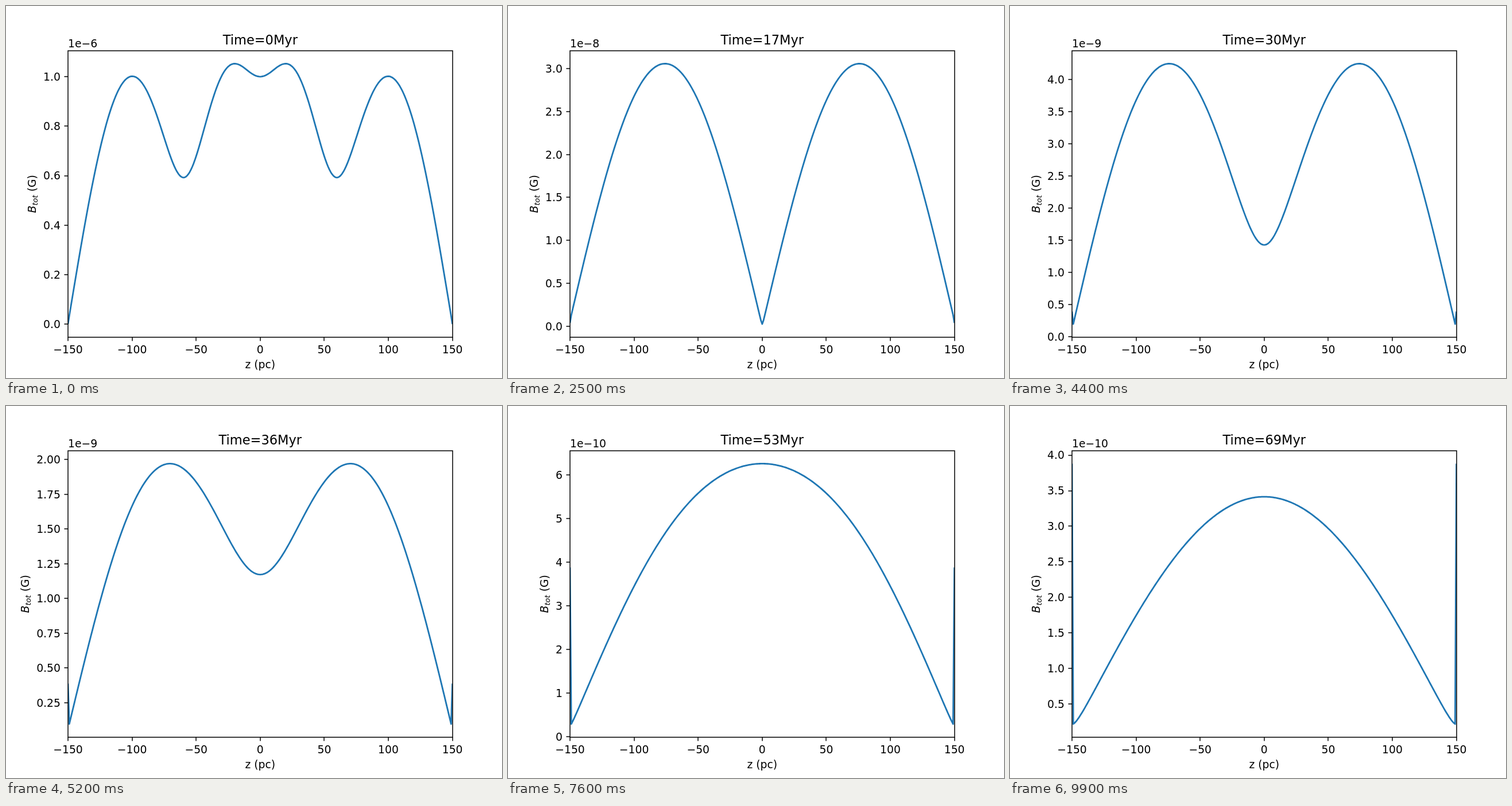
Recreate the animation shown at these times as an HTML page with a canvas. Size 864 px wide and 648 px high, loop 10000 ms.

```html
<!DOCTYPE html>
<html lang="en">
<head>
<meta charset="utf-8">
<title>Field decay</title>
<style>
  html, body { margin: 0; width: 100%; height: 100%; overflow: hidden; background: #fff; }
  canvas { display: block; }
</style>
</head>
<body>
<canvas id="plot" width="864" height="648"></canvas>
<script>
const ctx = document.getElementById('plot').getContext('2d');
const FRAMES = 100, FRAME_MS = 100, MYR = 0.7;
const LEFT = 108, RIGHT = 777.6, TOP = 77.76, BOTTOM = 576.72;
const MID_X = (LEFT + RIGHT) / 2, MID_Y = (TOP + BOTTOM) / 2;
const FONT = '"DejaVu Sans", sans-serif';

// Two field components (in microgauss) on a 1 pc grid, z = -151..151,
// diffusing with fixed end values.
const SIZE = 303, STEPS = 600, RATE = 347.7 * MYR / STEPS;
const EDGE = 3.88e-4, GHOST = 2.05e-5;

function diffuse(u) {
  for (let s = 0; s < STEPS; s++) {
    let prev = u[0];
    for (let i = 1; i < SIZE - 1; i++) {
      const cur = u[i];
      u[i] += RATE * (prev - 2 * cur + u[i + 1]);
      prev = cur;
    }
  }
}

function simulate() {
  const even = new Float64Array(SIZE), odd = new Float64Array(SIZE);
  for (let i = 1; i < SIZE - 1; i++) {
    const z = i - 151;
    even[i] = Math.cos(Math.PI * z / 100.04);
    odd[i] = 0.04 * z * Math.exp(-z * z / 2312);
  }
  odd[0] = -GHOST;
  odd[SIZE - 1] = GHOST;
  return Array.from({ length: FRAMES }, (_, n) => {
    if (n) { diffuse(even); diffuse(odd); }
    const total = Array.from(even, (e, i) => Math.hypot(e, odd[i])).slice(1, -1);
    total[0] = total[300] = EDGE;
    return total;
  });
}

const profiles = simulate();

function text(str, x, y, align = 'center', size = 18.75, style = '') {
  ctx.font = `${style} ${size}px ${FONT}`;
  ctx.textAlign = align;
  ctx.fillText(str, x, y);
  return ctx.measureText(str).width;
}

function line(x1, y1, x2, y2) {
  ctx.beginPath();
  ctx.moveTo(x1, y1);
  ctx.lineTo(x2, y2);
  ctx.stroke();
}

// Tick step, exponent and decimals for a value range
function scaleTicks(lo, hi) {
  const raw = (hi - lo) / 9;
  const power = 10 ** Math.floor(Math.log10(raw));
  const step = power * [1, 2, 2.5, 5, 10].find(m => m * power >= raw);
  const first = Math.ceil(lo / step), last = Math.floor(hi / step);
  const exp = Math.floor(Math.log10(last * step) + 1e-9);
  const unit = step / 10 ** exp;
  const digits = [0, 1, 2, 3].find(d => {
    const v = unit * 10 ** d;
    return Math.abs(v - Math.round(v)) < 1e-6;
  });
  return { step, first, last, exp, unit, digits };
}

function drawYLabel(x) {
  const parts = [['B', 18.75, 0, 'italic'], ['tot', 13.125, 3.3, 'italic'], [' (G)', 18.75, 0, '']];
  ctx.save();
  ctx.translate(x, MID_Y + 33.2);
  ctx.rotate(-Math.PI / 2);
  let pen = 0;
  for (const [str, size, drop, style] of parts) pen += text(str, pen, drop, 'left', size, style);
  ctx.restore();
}

function draw(n) {
  const data = profiles[n];
  const min = Math.min(...data), max = Math.max(...data);
  const pad = (max - min) * 0.05, lo = min - pad, hi = max + pad;
  const toY = v => BOTTOM - (v - lo) / (hi - lo) * (BOTTOM - TOP);
  const toX = z => MID_X + z / 300 * (RIGHT - LEFT);

  ctx.fillStyle = '#fff';
  ctx.fillRect(0, 0, 864, 648);

  ctx.save();
  ctx.beginPath();
  ctx.rect(LEFT, TOP, RIGHT - LEFT, BOTTOM - TOP);
  ctx.clip();
  ctx.beginPath();
  data.forEach((v, i) => ctx.lineTo(toX(i - 150), toY(v)));
  ctx.strokeStyle = '#1f77b4';
  ctx.lineWidth = 2.8125;
  ctx.lineJoin = 'round';
  ctx.stroke();
  ctx.restore();

  ctx.fillStyle = ctx.strokeStyle = '#000';
  ctx.lineWidth = 1.5;
  ctx.strokeRect(108, 78, 670, 499);

  for (let z = -150; z <= 150; z += 50) {
    const x = Math.round(toX(z));
    line(x, 577, x, 583.56);
    text(String(z).replace('-', '\u2212'), toX(z), 604.7);
  }

  const t = scaleTicks(lo, hi);
  let widest = 0;
  for (let i = t.first; i <= t.last; i++) {
    const y = toY(i * t.step), row = Math.round(y);
    line(101.44, row, 108, row);
    widest = Math.max(widest, text((i * t.unit).toFixed(t.digits), 94.9, y + 6.9, 'right'));
  }

  text('1e\u2212' + (6 - t.exp), LEFT, 72.1, 'left');
  text(`Time=${Math.floor(n * MYR + 1e-9)}Myr`, MID_X, 66.5, 'center', 22.5);
  text('z (pc)', MID_X, 630.7);
  drawYLabel(94.9 - widest - 13.1);
}

let shown = -1;
function tick() {
  const n = Math.floor(performance.now() / FRAME_MS) % FRAMES;
  if (n !== shown) draw(shown = n);
  requestAnimationFrame(tick);
}
tick();
</script>
</body>
</html>
```
